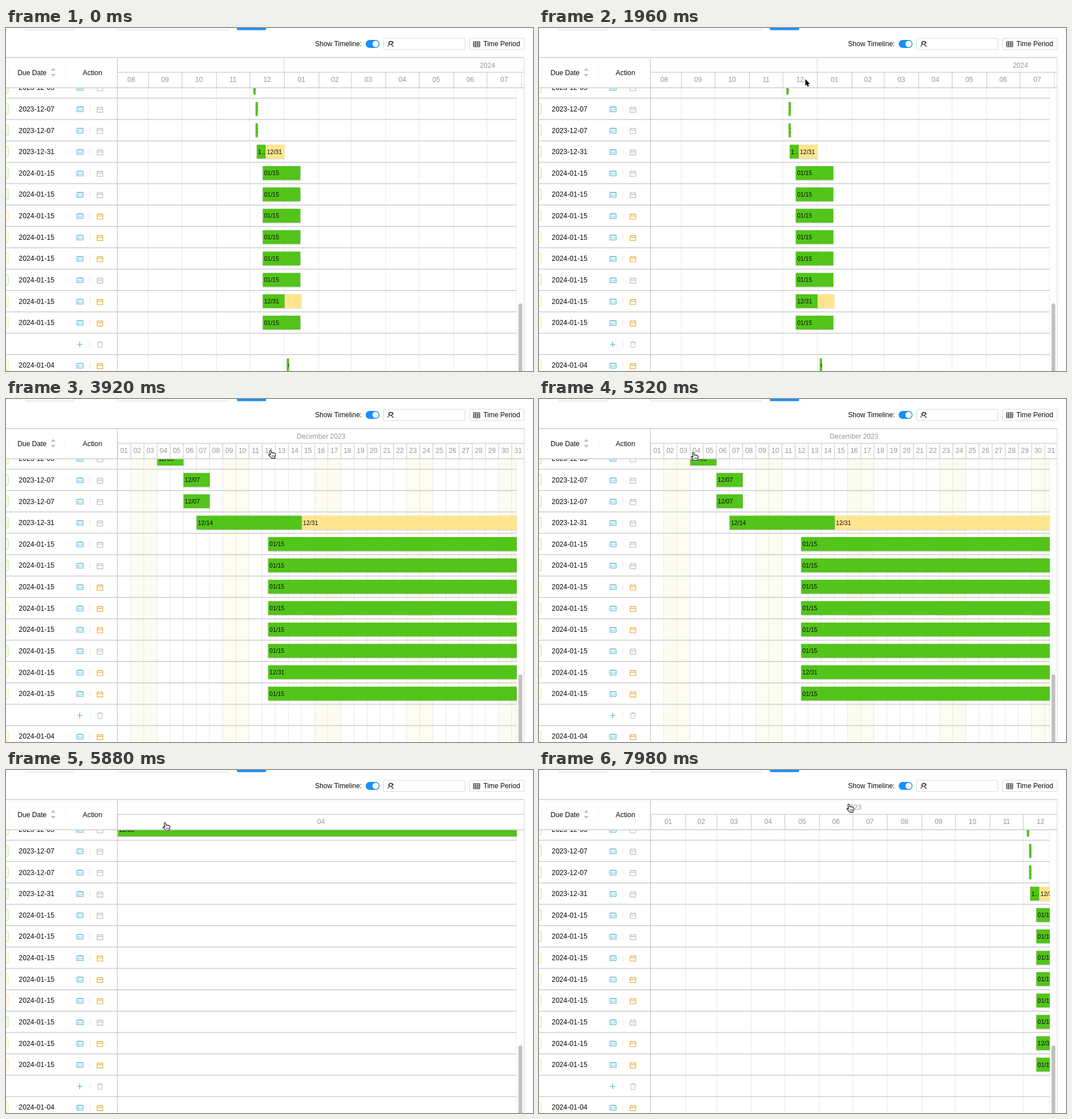
An HTML page with a canvas for the animation above (8000 ms loop, 926 by 604 pixels).

```html
<!DOCTYPE html>
<html lang="en">
<head>
<meta charset="utf-8">
<title>Timeline drill-down</title>
<style>
  html, body { margin: 0; width: 100%; height: 100%; overflow: hidden; background: #fff; }
  canvas { display: block; }
</style>
</head>
<body>
<canvas id="stage" width="926" height="604"></canvas>
<script>
const ctx = document.getElementById('stage').getContext('2d');
const LOOP = 8000, STEP = 70;
const LEFT = 196, BODY_RIGHT = 897.5, RIGHT = 910.5, HEAD_TOP = 52, HEAD_MID = 78, BODY_TOP = 105;
const ROW_H = 37.63, ROW_0 = 104.9;
const LINE = '#c9c9c9', PALE = '#e8e8e8', GREEN = '#52c41a', YELLOW = '#ffe58f';
const BLUE = '#1890ff', CYAN = '#45b3d6', GREY = '#bcbcbc', ORANGE = '#eba936';

// Days are counted from 1 December 2023.
const monthStart = m => (Date.UTC(2023, m, 1) - Date.UTC(2023, 11, 1)) / 864e5;
const pad = n => String(n).padStart(2, '0');
const months = (from, to) => Array.from({ length: to - from }, (_, i) =>
  ({ from: monthStart(from + i), to: monthStart(from + i + 1), label: pad((from + i) % 12 + 1) }));
const days = (from, to) => Array.from({ length: to - from }, (_, i) =>
  ({ from: from + i, to: from + i + 1, label: pad(from + i + 1) }));

const views = [
  { start: 0, zero: 428.3, scale: 1.957, cells: months(7, 19), title: '2024', titleX: 846, split: 488.8 },
  { start: 3920, zero: 196, scale: 23.08, cells: days(0, 31), title: 'December 2023', titleX: 553.5, weekends: true },
  { start: 5880, zero: 196 - 3 * 715, scale: 715, cells: days(3, 4), title: '', titleX: 553.5 },
  { start: 7560, zero: 850.9, scale: 1.9585, cells: months(0, 12), title: '2023', titleX: 553.5 }
];

const task = (due, from, done, end, label) => ({ due, from, done, end, label });
const rows = [
  task('2023-12-05', 3, 5, 5, '12/05'),
  task('2023-12-07', 5, 7, 7, '12/07'),
  task('2023-12-07', 5, 7, 7, '12/07'),
  task('2023-12-31', 6, 14, 31, '12/14'),
  ...Array.from({ length: 8 }, () => task('2024-01-15', 11.44, 45.2, 45.2, '01/15')),
  null,
  task('2024-01-04', 33, 35, 35, '01/04')
];
rows[10] = task('2024-01-15', 11.44, 31, 46, '12/31');
const pending = [6, 7, 8, 10, 11, 13];

// Pointer path: time, x, y
const path = [
  [210, 487, 532], [700, 434, 89], [770, 434, 89], [1050, 469, 90], [1890, 469, 90],
  [1960, 468, 90], [2030, 468, 89], [3500, 468, 89], [3570, 465, 90], [4480, 465, 90],
  [4760, 370, 97], [5040, 270, 95], [5250, 270, 95], [5320, 271, 94], [5390, 274, 103],
  [5530, 279.5, 92.5], [6370, 279.5, 92.5], [6510, 325, 100], [6650, 440, 71], [6790, 513, 74],
  [6930, 513, 74], [7210, 540, 50], [7350, 546, 58], [7910, 546, 58], [7980, 544.5, 60]
];
// Click rings: start, end, x, y, radius
const clicks = [
  [2870, 2940, 467.5, 89, 14], [2940, 3010, 467.5, 89, 19], [3780, 3850, 465, 90, 26],
  [5670, 5810, 279, 93, 26], [7490, 7560, 546, 56, 26]
];
const arrow = new Path2D('M0 0V11.6L2.6 9.2 4.3 13.2 6.2 12.4 4.6 8.5H8.2Z');
const hand = new Path2D('M-1.6 1.4C-1.6-.4 .8-.4 1 1.2L1.8 5C2.2 4 4 4.2 4.2 5.3 4.8 4.5 6.3 4.7 6.5 5.8 ' +
  '7.3 5.2 8.5 5.7 8.6 7 8.8 9.5 8.2 11 7.4 12.4V14.4H1.2C.5 12.5-1.5 11-3.2 8.6-4 7.4-2.2 6.4-1 7.8L-.3 8.2Z');
const handLines = new Path2D('M2.4 8.8V12M4.3 8.8V12M6.2 8.8V12');

function rect(x, y, w, h, color) {
  ctx.fillStyle = color;
  ctx.fillRect(x, y, w, h);
}
const hLine = (x1, x2, y, color = LINE) => rect(x1, y - .7, x2 - x1, 1.4, color);
const vLine = (x, y1, y2, color = LINE) => rect(x - .5, y1, 1, y2 - y1, color);

function text(str, x, y, size = 12.1, color = '#0c0c0c', align = 'left') {
  ctx.font = size + 'px "Liberation Sans", Arial, sans-serif';
  ctx.textAlign = align;
  ctx.fillStyle = color;
  ctx.fillText(str, x, y + size * .355);
}
function box(x, y, w, h, r, stroke, fill) {
  ctx.beginPath();
  ctx.roundRect(x, y, w, h, r);
  if (fill) { ctx.fillStyle = fill; ctx.fill(); }
  if (stroke) { ctx.strokeStyle = stroke; ctx.lineWidth = 1; ctx.stroke(); }
}
function icon(x, y, color, d, width = 1) {
  ctx.save();
  ctx.translate(x, y);
  ctx.strokeStyle = color;
  ctx.lineWidth = width;
  ctx.stroke(new Path2D(d));
  ctx.restore();
}
function clipped(x, y, w, h, draw) {
  ctx.save();
  ctx.beginPath();
  ctx.rect(x, y, w, h);
  ctx.clip();
  draw();
  ctx.restore();
}

function drawToolbar() {
  box(34.5, -10, 85, 13.5, 2, '#d9d9d9');
  box(195.5, -10, 196, 13.5, 2, '#d9d9d9');
  box(405.7, -10, 51.3, 13.7, 2, null, BLUE);
  text('Show Timeline:', 543, 28);
  box(632, 21, 24.3, 14, 7, null, BLUE);
  box(643.9, 22.5, 11, 11, 5.5, null, '#fff');
  box(663.5, 18, 143, 20, 2, '#d9d9d9');
  icon(676, 28, '#222', 'M-2.8-1.8a2.8 2.8 0 1 1 5.6 0a2.8 2.8 0 1 1-5.6 0M-5 5C-5 2.6-3.4 1-1.2 1M1.2 1.2L4.8 5M-3.6 .2C-5-4.8 5-6.6 4.2-.8', 1.1);
  icon(827, 28.5, '#222', 'M-5.5-4.5h11v9h-11zM-5.5-1.5h11M-5.5 1.5h11M-2-4.5v9M2-4.5v9');
  box(814.5, 18, 96, 20, 2, '#d9d9d9');
  text('Time Period', 838.7, 28);
}

function drawActions(row, i, y) {
  vLine(147.5, y - 5, y + 5, PALE);
  if (!row) {
    icon(129.5, y + .8, CYAN, 'M-4.7 0h9.4M0-4.7v9.4', 1.2);
    icon(165, y + .8, GREY, 'M-5-3.5h10M-2-3.5v-1.7h4v1.7M-4-3.5l.6 8.7h6.8l.6-8.7');
    return;
  }
  const late = pending.includes(i);
  box(-10, y - 9.3, 14, 18.6, 2, late ? '#ffe58f' : '#b7eb8f', late ? '#fffbe6' : '#f6ffed');
  text(row.due, 22.3, y, 12.3);
  icon(130, y + .4, CYAN, 'M-5.5-3.7h11v8.2h-11zM-3-5.2v2.6M0-5.2v2.6M3-5.2v2.6M-3.7 0h2.8M-3.7 2.2h2.8M.4.9l1.4 1.4L4.2-.7');
  icon(165, y + 1, late ? ORANGE : GREY, 'M-5-3.8h10v8.6h-10zM-5-.7h10M-2.4-5.3v2.6M2.4-5.3v2.6', 1.1);
}

function drawTable() {
  clipped(0, BODY_TOP, LEFT, 500, () => rows.forEach((row, i) => {
    const y = ROW_0 + i * ROW_H;
    drawActions(row, i, y);
    hLine(0, LEFT, y + 18.7);
  }));
  text('Due Date', 20.2, 79);
  ctx.fillStyle = GREY;
  ctx.fill(new Path2D('M83 70.5l4 4.6h-8zM83 85.5l4-4.6h-8z'));
  text('Action', 134.8, 79, 12.3);
  vLine(104.5, 70, 87, '#f0f0f0');
  vLine(5.5, 70, 87, '#f0f0f0');
}

function drawBar(x1, x2, y, color, label) {
  const top = y - 12.3, w = x2 - x1;
  ctx.save();
  ctx.shadowColor = 'rgba(0,0,0,.18)';
  ctx.shadowBlur = 2;
  ctx.shadowOffsetY = 1;
  rect(x1, top, w, 24.4, color);
  ctx.restore();
  if (w > 10 && w < 28) label = label[0] + '…';
  clipped(x1, top, w, 24.4, () => text(label, x1 + 2.2, y, 10.6));
}

function drawTimeline(view) {
  const at = day => view.zero + day * view.scale;
  const barAt = day => at(day) + .5;
  clipped(LEFT, BODY_TOP, BODY_RIGHT - LEFT, 500, () => {
    view.cells.forEach((cell, i) => {
      if (view.weekends && [1, 2].includes(i % 7)) rect(at(cell.from), BODY_TOP, view.scale, 500, '#fcfcf0');
    });
    view.cells.forEach(cell => vLine(at(cell.to), BODY_TOP, 604, PALE));
    vLine(BODY_RIGHT - .5, BODY_TOP, 604, PALE);
    rows.forEach((row, i) => {
      const y = ROW_0 + i * ROW_H;
      hLine(LEFT, BODY_RIGHT, y + 18.7);
      if (!row) return;
      if (row.end > row.done) drawBar(barAt(row.done), barAt(row.end), y, YELLOW, i === 3 ? '12/31' : '');
      drawBar(barAt(row.from), barAt(row.done), y, GREEN, row.label);
    });
  });
  clipped(LEFT, HEAD_TOP, RIGHT - LEFT, BODY_TOP - HEAD_TOP, () => {
    view.cells.forEach(cell => {
      vLine(at(cell.from) + .5, HEAD_MID, BODY_TOP, '#d6d6d6');
      vLine(at(cell.to), HEAD_MID, BODY_TOP, '#d6d6d6');
      text(cell.label, at((cell.from + cell.to) / 2), 91, 12.1, '#999', 'center');
    });
    if (view.split) vLine(view.split, HEAD_TOP, HEAD_MID, '#d6d6d6');
    text(view.title, view.titleX, 65.3, 12, '#999', 'center');
  });
  hLine(LEFT, RIGHT, HEAD_MID, '#d0d0d0');
  hLine(0, RIGHT, HEAD_TOP);
  hLine(0, RIGHT, BODY_TOP + .3);
  vLine(195.6, HEAD_TOP, 604, '#bdbdbd');
  vLine(RIGHT, HEAD_TOP, 604, '#d6d6d6');
  box(900.5, 485, 6.8, 140, 3.4, null, '#c1c1c1');
}

function pointerAt(t) {
  const next = path.findIndex(p => p[0] > t);
  if (next < 0) return path[path.length - 1].slice(1);
  const [t0, x0, y0] = path[next - 1], [t1, x1, y1] = path[next];
  const p = (t - t0) / (t1 - t0);
  const eased = (p + p * p * (3 - 2 * p)) / 2;
  return [x0 + (x1 - x0) * eased, y0 + (y1 - y0) * eased];
}

function drawPointer(t) {
  for (const [from, to, x, y, r] of clicks) {
    if (t < from || t >= to) continue;
    ctx.beginPath();
    ctx.arc(x, y, r, 0, 7);
    ctx.strokeStyle = 'rgba(0,0,0,.45)';
    ctx.lineWidth = 1.5;
    ctx.stroke();
  }
  if (t < path[0][0]) return;
  const isHand = t >= 3570, shape = isHand ? hand : arrow;
  ctx.save();
  ctx.translate(...pointerAt(t));
  ctx.lineJoin = 'round';
  ctx.strokeStyle = '#fff';
  ctx.lineWidth = isHand ? 2.2 : 1.8;
  ctx.stroke(shape);
  ctx.fillStyle = isHand ? '#fff' : '#000';
  ctx.fill(shape);
  if (isHand) {
    ctx.strokeStyle = '#111';
    ctx.lineWidth = 1.1;
    ctx.stroke(hand);
    ctx.lineWidth = .7;
    ctx.stroke(handLines);
  }
  ctx.restore();
}

function frame() {
  const t = Math.floor(performance.now() % LOOP / STEP) * STEP;
  rect(0, 0, 926, 604, '#fff');
  drawToolbar();
  drawTable();
  drawTimeline(views.findLast(v => t >= v.start));
  drawPointer(t);
  requestAnimationFrame(frame);
}
frame();
</script>
</body>
</html>
```
